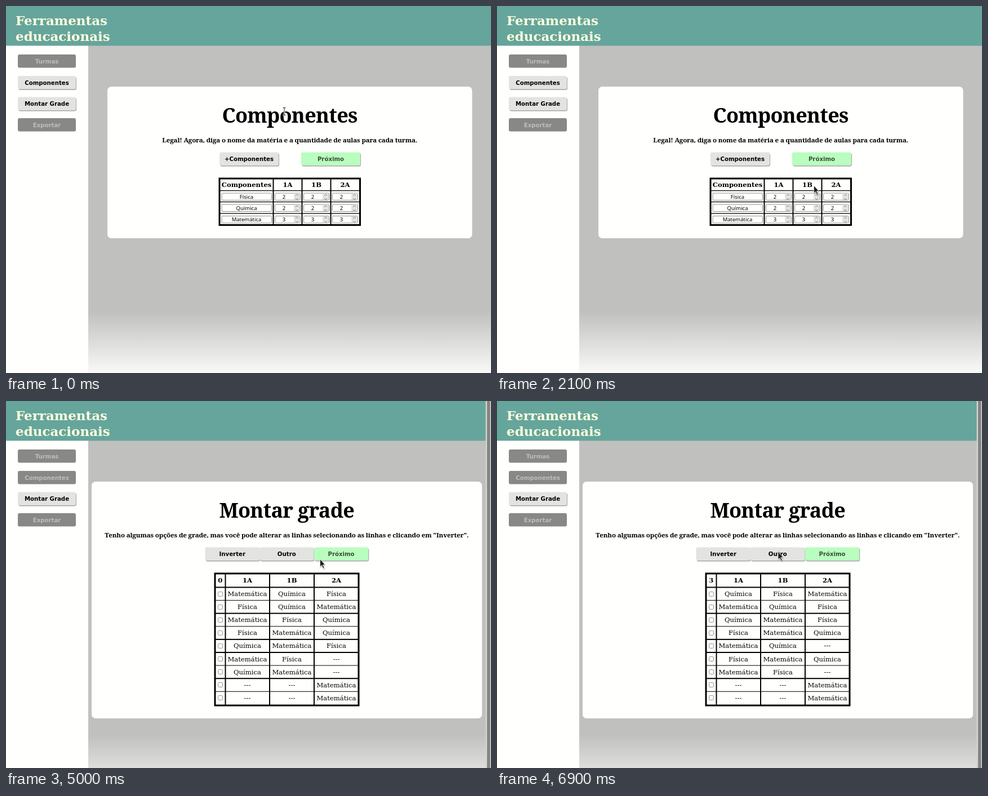
An HTML page for the animation above (8000 ms loop, 861 px wide and 651 px high).

```html
<!DOCTYPE html>
<html lang="pt">
<head>
<meta charset="utf-8">
<title>Ferramentas educacionais</title>
<style>
html, body { margin: 0; width: 100%; height: 100%; overflow: hidden; background: #c0c0be; }
svg { display: block; width: 861px; height: 651px; }
text { text-anchor: middle; fill: #000; }
.brand { font: bold 23px "DejaVu Serif", serif; text-anchor: start; fill: #ffffe0; }
.title { font: bold 36px "Noto Serif", serif; letter-spacing: -.02em; }
.lead { font: bold 11.6px "Noto Serif", serif; letter-spacing: -.013em; }
.label { font: bold 10.2px "DejaVu Sans", sans-serif; }
.head { font: bold 11.6px "DejaVu Serif", serif; }
.cell { font: 11.6px "DejaVu Serif", serif; }
.field { font: 9.5px "Noto Sans", sans-serif; }
.input { fill: #fffffd; stroke: #909090; }
.chevron { fill: none; stroke: #777; }
.off { fill: #bdbdbb; }
.next { fill: #3c4c3c; }
</style>
</head>
<body>
<svg viewBox="0 0 861 651">
  <defs>
    <linearGradient id="fadeA" x1="0" x2="0" y1="0" y2="1">
      <stop stop-color="#c0c0be"/><stop offset="1" stop-color="#f9f9f7"/>
    </linearGradient>
    <linearGradient id="fadeB" x1="0" x2="0" y1="0" y2="1">
      <stop stop-color="#c0c0be"/><stop offset="1" stop-color="#dededc"/>
    </linearGradient>
    <filter id="soft" x="-50%" y="-50%" width="200%" height="200%"><feGaussianBlur stdDeviation="1"/></filter>
  </defs>
  <g id="frame"></g>
  <g id="subjects"></g>
  <g id="schedule"></g>
  <g id="arrow">
    <path d="M1 2V16L4.200 13L7 19L9 18L6.400 12.300H10.500Z" opacity=".35" filter="url(#soft)"/>
    <path d="M.5 .5V14L3.500 11.300L6 17L8 16.100L5.600 10.500H9.500Z" fill="#1c1c1c" stroke="#f4f4f2" stroke-width=".8"/>
  </g>
  <g id="beam" fill="none">
    <path id="beamHalo" d="M-2.500 -6.500H2.500M0 -6.500V6.500M-2.500 6.500H2.500" stroke="#fff" stroke-width="2.600"/>
    <path d="M-2.500 -6.500H2.500M0 -6.500V6.500M-2.500 6.500H2.500" stroke="#222"/>
  </g>
</svg>
<script>
const LOOP = 8000, STEP = 100;
const byId = id => document.getElementById(id);

const rect = (x, y, w, h, fill, r = 0) =>
  `<rect x="${x}" y="${y}" width="${w}" height="${h}" rx="${r}" fill="${fill}"/>`;
const text = (x, y, cls, str) => `<text x="${x}" y="${y}" class="${cls}">${str}</text>`;
const vLine = (x, top, bottom, w = 2) => rect(x - w / 2, top, w, bottom - top, '#000');
const hLine = (y, left, right, w) => rect(left, y - w / 2, right - left, w, '#000');
const outline = (x, y, w, h) =>
  `<rect x="${x + 1.5}" y="${y + 1.5}" width="${w - 3}" height="${h - 3}" fill="none" stroke="#000" stroke-width="3"/>`;
const input = (x, y, w, h, r = 2) =>
  `<rect class="input" x="${x}" y="${y}" width="${w}" height="${h}" rx="${r}"/>`;

function button(x, y, w, label, kind = 'on') {
  const fill = { on: '#e3e3e1', off: '#888886', next: '#b9fdbf' }[kind];
  const shadow = kind === 'off' ? '' : rect(x + 1, y + 1.5, w, 23.5, '#a6a6a4', 3.5);
  return shadow + rect(x, y, w, 23.5, fill, 3) + text(x + w / 2, y + 15.5, 'label ' + kind, label);
}
const page = (x, w, h, center, title, lead) =>
  rect(x, 143, w, h, '#fffffd', 7) + text(center, 207, 'title', title) + text(center, 242, 'lead', lead);

byId('frame').innerHTML =
  rect(0, 0, 861, 651, '#c0c0be') +
  rect(0, 70, 146, 581, '#fffffd') +
  rect(0, 0, 861, 70.5, '#66a59b') +
  text(17, 33.5, 'brand', 'Ferramentas') + text(17, 62, 'brand', 'educacionais') +
  button(21, 86, 103, 'Turmas', 'off') +
  button(21, 161.5, 103, 'Montar Grade') +
  button(21, 199, 103, 'Exportar', 'off');

function spinner(x, y, value) {
  return input(x, y - 6, 45, 12.5) + rect(x + 33.5, y - 5.5, 10.5, 11.5, '#e4e4e2') +
    `<path class="chevron" d="M${x + 36.5} ${y - 1.5}l2.500 -2.500l2.500 2.500m0 4.500l-2.500 2.500l-2.500 -2.500"/>` +
    text(x + 16, y + 3.5, 'field', value);
}

function subjectsView() {
  let out = rect(146, 542, 715, 109, 'url(#fadeA)') +
    page(180, 647.5, 269, 503.7, 'Componentes',
      'Legal! Agora, diga o nome da matéria e a quantidade de aulas para cada turma.') +
    button(21, 124, 103, 'Componentes') +
    button(379, 259.5, 105, '+Componentes') + button(524, 259.5, 105, 'Próximo', 'next') +
    outline(377.5, 304.5, 252.5, 85.5) + text(427, 320.5, 'head', 'Componentes');
  [327.5, 347.5, 368].forEach(y => { out += hLine(y, 379, 629, 1.3); });
  ['1A', '1B', '2A'].forEach((name, i) => {
    out += vLine(474.5 + 51 * i, 306, 389) + text(500 + 51 * i, 320.5, 'head', name);
  });
  [['Física', 2, 338], ['Química', 2, 358], ['Matemática', 3, 378.5]].forEach(([name, count, y]) => {
    out += input(383, y - 6, 88.5, 12.5) + text(427, y + 3.5, 'field', name);
    for (let i = 0; i < 3; i++) out += spinner(477.5 + 51 * i, y, count);
  });
  return out;
}

const COLUMNS = [428.5, 507.5, 586.5];
const NAMES = { M: 'Matemática', Q: 'Química', F: 'Física', '-': '---' };
const PLANS = [
  { from: 0, number: 0, rows: 'MQF FQM MFQ FMQ QMF MF- QM- --M --M' },
  { from: 6100, number: 2, rows: 'FMQ QFM MQF MFQ QMF MQ- FM- --M --M' },
  { from: 6900, number: 3, rows: 'QFM MQF QMF FMQ MQ- FMQ MF- --M --M' }
];

function planCells({ number, rows }) {
  return text(380.3, 322, 'head', number) + rows.split(' ').map((row, r) =>
    [...row].map((key, c) => text(COLUMNS[c], Math.round(346 + 23.1 * r), 'cell', NAMES[key])).join('')
  ).join('');
}

function scheduleView() {
  let out = rect(146, 592, 715, 59, 'url(#fadeB)') +
    page(152, 693, 420, 498.3, 'Montar grade',
      'Tenho algumas opções de grade, mas você pode alterar as linhas selecionando as linhas e clicando em "Inverter".') +
    button(21, 124, 103, 'Componentes', 'off') +
    button(353.5, 259.5, 96.5, 'Inverter') + button(450, 259.5, 96.5, 'Outro') +
    button(546.8, 259.5, 96.5, 'Próximo', 'next') +
    outline(369.5, 304.5, 258, 237);
  [389.5, 468, 547].forEach(x => { out += vLine(x, 306, 540); });
  const dayStarts = [0, 2, 4, 5, 7];
  for (let r = 0; r < 9; r++) {
    const y = 330.5 + 23.1 * r;
    out += hLine(y, 371, 626, dayStarts.includes(r) ? 2 : 1) + input(376.5, Math.round(y + 7) + .5, 8, 8);
  }
  ['1A', '1B', '2A'].forEach((name, i) => { out += text(COLUMNS[i], 322, 'head', name); });
  out += PLANS.map((plan, i) => `<g id="plan${i}">${planCells(plan)}</g>`).join('');
  return out + rect(851.5, 0, 9.5, 651, '#d2d2d0') + rect(854, 0, 5.5, 651, '#848482');
}

byId('subjects').innerHTML = subjectsView();
byId('schedule').innerHTML = scheduleView();

// Pointer waypoints: time, x, y
const PATH = [
  [0, 494, 187], [800, 494, 187], [1000, 498, 197], [1300, 502, 229], [1500, 474, 258],
  [1700, 446, 277], [1800, 450, 284], [1900, 478, 310], [2000, 520, 328], [2100, 562, 318],
  [2200, 594, 293], [2300, 609, 277], [2400, 609, 277], [2500, 615, 275], [2600, 604, 274],
  [2800, 574, 274], [4900, 574, 274], [5000, 557, 280], [5200, 530, 278], [5600, 498.5, 267], [LOOP, 498.5, 267]
];

function pointerAt(t) {
  const i = PATH.findIndex(p => p[0] > t);
  const [t0, x0, y0] = PATH[i - 1], [t1, x1, y1] = PATH[i];
  const k = (t - t0) / (t1 - t0);
  return [x0 + (x1 - x0) * k, y0 + (y1 - y0) * k];
}

const show = (id, on) => { byId(id).style.display = on ? '' : 'none'; };

function render() {
  const t = Math.floor(performance.now() % LOOP / STEP) * STEP;
  const [x, y] = pointerAt(t);
  const overText = t < 1700 && (y < 214 || (y > 231 && y < 246));
  show('subjects', t < 3100);
  show('schedule', t >= 3100);
  PLANS.forEach((plan, i) =>
    show('plan' + i, t >= plan.from && t < (PLANS[i + 1]?.from ?? LOOP)));
  show('arrow', !overText);
  show('beam', overText);
  for (const id of ['arrow', 'beam']) byId(id).setAttribute('transform', `translate(${x} ${y})`);
  requestAnimationFrame(render);
}
render();
</script>
</body>
</html>
```
